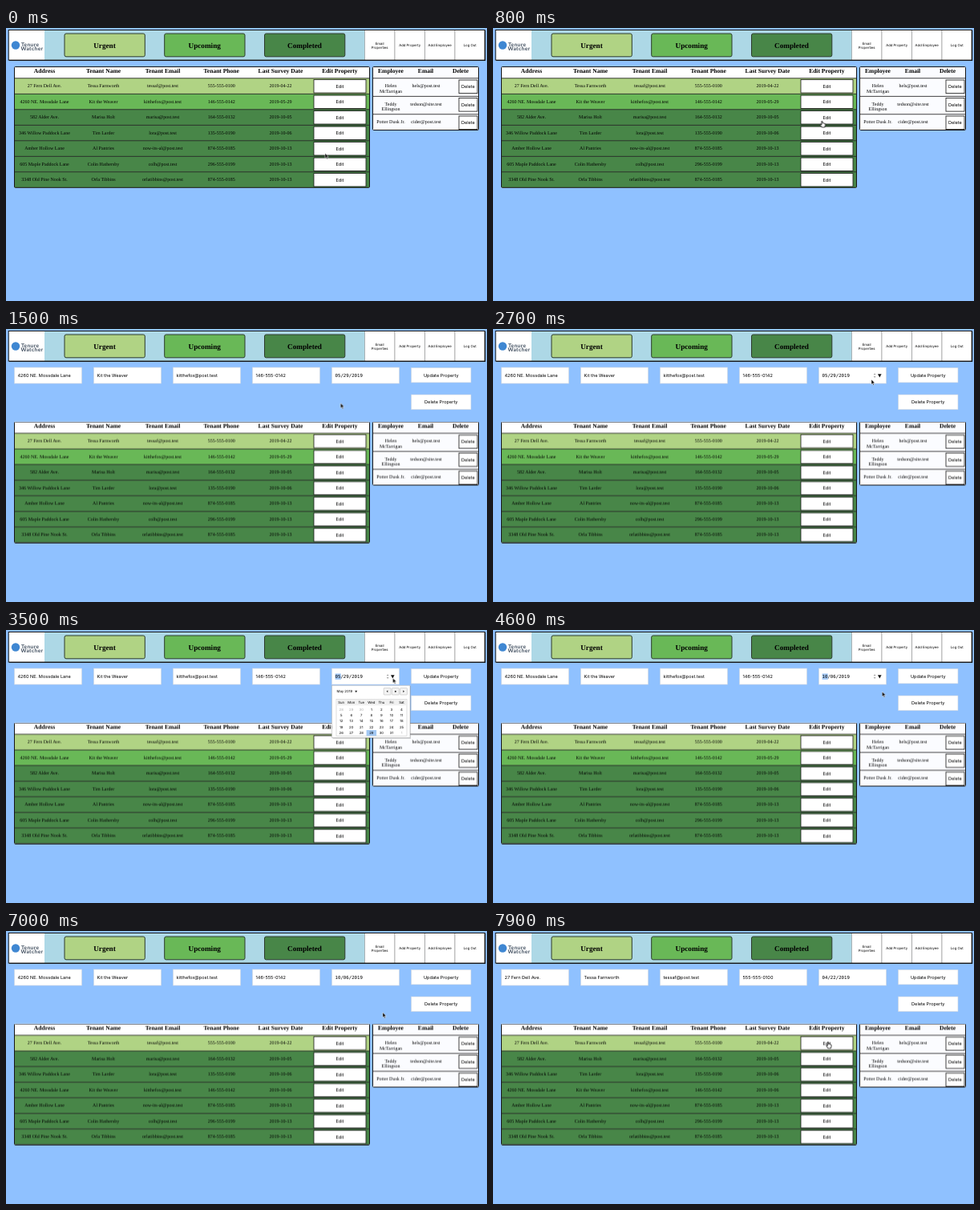
An HTML page for the animation above (8000 ms loop, 600 px wide and 341 px high).

```html
<!DOCTYPE html>
<html lang="en">
<head>
<meta charset="utf-8">
<title>Tenure Watcher</title>
<style>
html, body { margin: 0; width: 100%; height: 100%; overflow: hidden; background: #8fc1ff; }
svg { display: block; width: 100vw; height: 100vh; }
text { text-anchor: middle; text-rendering: geometricPrecision; fill: #000; }
.cell { font: 6px "Liberation Serif", serif; }
.head { font: bold 7.55px "Liberation Serif", serif; }
.tab { font: bold 9.2px "Liberation Serif", serif; }
.ui { font: 5.6px Inter, sans-serif; }
.nav { font: 4.3px Inter, sans-serif; }
.cal { font: 4.3px Inter, sans-serif; }
.date { font: 5.7px "DejaVu Sans Mono", monospace; }
.logo { font: bold 6.6px Lato, sans-serif; letter-spacing: .4px; fill: #3d4b5c; }
.start { text-anchor: start; }
.dim { fill: #aaa; }
.page { animation: drop 8s step-end infinite; }
@keyframes drop {
  0% { transform: none; }
  18.75%, 100% { transform: translateY(67.5px); }
}
.cursor { animation: roam 8s linear infinite; }
@keyframes roam {
  0%, 1.25% { transform: translate(398px, 156.5px); }
  6% { transform: translate(402px, 142px); }
  11.25% { transform: translate(413px, 108px); }
  16%, 23.75% { transform: translate(417.4px, 92.6px); }
  28% { transform: translate(436px, 80px); }
  33.75%, 35% { transform: translate(472px, 63px); }
  40%, 43.75% { transform: translate(482.5px, 60px); }
  48% { transform: translate(484.5px, 69px); }
  52.5%, 60% { transform: translate(485.5px, 77px); }
  62.5% { transform: translate(506px, 68px); }
  65%, 75% { transform: translate(523.5px, 58.5px); }
  77.5% { transform: translate(503px, 74px); }
  80%, 86.25% { transform: translate(479px, 94px); }
  90% { transform: translate(452px, 117px); }
  95%, 100% { transform: translate(418px, 138.5px); }
}
</style>
</head>
<body>
<svg id="stage" viewBox="0 0 600 341" preserveAspectRatio="none"></svg>
<script>
const LOOP = 8000;
const INK = '#151515';
const TONE = { urgent: '#b0d384', soon: '#69b857', done: '#488648' };
const COLS = [48, 121.5, 195.5, 268.7, 342.5];
const ROW_TOP = 62.8, PITCH = 19.5;
let rules = '', ruleId = 0;

const text = (x, y, s, cls) => `<text x="${x}" y="${y}" class="${cls}">${s}</text>`;
const box = (x, y, w, h, fill, stroke = 'none', line = .8, r = 0) =>
  `<rect x="${x}" y="${y}" width="${w}" height="${h}" rx="${r}" fill="${fill}" stroke="${stroke}" stroke-width="${line}"/>`;
const rule = (x, y, w) => box(x, y - .4, w, .8, INK);
const shape = (d, fill, extra = '') => `<path d="${d}" fill="${fill}" ${extra}/>`;

// Shows a group only inside the given [from, to] spans (ms).
function during(spans, body) {
  const name = 'show' + ruleId++;
  const pct = ms => ms / LOOP * 100 + '%';
  const keys = spans.map(([a, b]) => `${pct(a)}{opacity:1}${pct(b)}{opacity:0}`).join('');
  rules += `@keyframes ${name}{0%{opacity:0}${keys}}`;
  return `<g style="animation:${name} ${LOOP}ms step-end infinite">${body}</g>`;
}

const homes = [
  ['27 Fern Dell Ave.', 'Tessa Farnworth', 'tessaf@post.test', '555-555-0100', '2019-04-22', 'urgent'],
  ['4260 NE. Mossdale Lane', 'Kit the Weaver', 'kitthefox@post.test', '146-555-0142', '2019-05-29', 'soon'],
  ['582 Alder Ave.', 'Marisa Holt', 'marisa@post.test', '164-555-0132', '2019-10-05', 'done'],
  ['346 Willow Paddock Lane', 'Tim Larder', 'lora@post.test', '135-555-0190', '2019-10-06', 'done'],
  ['Amber Hollow Lane', 'Al Pantries', 'now-its-al@post.test', '874-555-0185', '2019-10-13', 'done'],
  ['605 Maple Paddock Lane', 'Colin Hathersby', 'colh@post.test', '296-555-0199', '2019-10-13', 'done'],
  ['3348 Old Pine Nook St.', 'Orla Tibbins', 'orlatibbins@post.test', '874-555-0185', '2019-10-13', 'done']
];
const moved = [...homes[1].slice(0, 4), '2019-10-06', 'done'];
const resorted = [homes[0], homes[2], homes[3], moved, ...homes.slice(4)];

const staff = [
  [['Helen', 'McTarrigan'], 'hels@post.test'],
  [['Teddy', 'Ellingson'], 'tedson@site.test'],
  [['Potter Dusk Jr.'], 'cider@post.test']
];

const editButton = (i, fill) => {
  const y = ROW_TOP + i * PITCH;
  return box(384, y + 1.8, 65, 16.4, fill, INK, .8) + text(416.4, y + 11.8, 'Edit', 'ui');
};

const homeRow = (home, i) => {
  const y = ROW_TOP + i * PITCH;
  return box(10.5, y, 443, PITCH, TONE[home[5]]) + rule(10.5, y, 443) +
    COLS.map((x, c) => text(x, y + 11.6, home[c], 'cell')).join('') + editButton(i, '#fff');
};

function homeTable() {
  const heads = ['Address', 'Tenant Name', 'Tenant Email', 'Tenant Phone', 'Last Survey Date', 'Edit Property'];
  return box(10.5, 48.5, 443, 151, '#fff') +
    heads.map((s, i) => text([...COLS, 416.4][i], 56.4, s, 'head')).join('') +
    during([[0, 5800]], homes.map(homeRow).join('')) +
    during([[5800, LOOP]], resorted.map(homeRow).join('')) +
    during([[1300, 1500]], editButton(1, '#c6c6c6')) +
    during([[7800, 7900]], editButton(0, '#c6c6c6')) +
    box(10.5, 48.5, 443, 150.8, 'none', INK, 1, 1);
}

function staffTable() {
  const rows = staff.map(([name, mail], i) => {
    const y = ROW_TOP + i * 22.5;
    return rule(457.5, y, 132) +
      name.map((s, n) => text(480, y + 11.6 + n * 6.5, s, 'cell')).join('') +
      text(524, y + 11.6, mail, 'cell') +
      box(565, y + 2.2, 23, 16.6, '#fff', INK) + text(576.4, y + 12.4, 'Delete', 'ui');
  }).join('');
  return box(457.5, 48.5, 132, 79, '#fbfcff') +
    ['Employee', 'Email', 'Delete'].map((s, i) => text([480, 523.5, 567][i], 56.4, s, 'head')).join('') +
    rows + box(457.5, 48.5, 132, 79, 'none', INK, 1, 1);
}

function topBar() {
  const tabs = [['Urgent', 'urgent', 73], ['Upcoming', 'soon', 197.7], ['Completed', 'done', 322.5]];
  const nav = [['Email', 'Properties'], ['Add Property'], ['Add Employee'], ['Log Out']];
  return box(3.5, 2.5, 594, 38, '#add8e6') + box(3.5, 2.5, 44.5, 38, '#fff') +
    '<circle cx="12" cy="21.5" r="5.2" fill="#3f87d2"/>' +
    text(19, 22.6, 'Tenure', 'logo start') + text(18.5, 28, 'Watcher', 'logo start') +
    tabs.map(([s, tone, x]) => box(x, 7, 100.3, 28.8, TONE[tone], '#2c3a2c', 1, 2) +
      text(x + 50, 24.6, s, 'tab')).join('') +
    nav.map((lines, i) => {
      const x = 447.5 + i * 37.5;
      return box(x, 2.5, 37.5, 38, '#fff', '#8a8a8a', .6) +
        lines.map((s, n) => text(x + 18.7, 23.2 + n * 5 - (lines.length - 1) * 2.6, s, 'nav')).join('');
    }).join('') +
    box(3.2, 2.5, 594, 37.6, 'none', INK, 1) + box(597, 3, 1.2, 38, INK) + box(4, 40, 594, 1, INK);
}

const field = i => 10.5 + i * 99;
const values = home => home.slice(0, 4).map((s, i) => text(field(i) + 4, 60, s, 'ui start')).join('');
const dateText = s => text(410.6, 60.2, s, 'date start');
const formButton = (y, s, fill = '#fff') =>
  box(505.5, y, 74.5, 18.6, fill, '#c9d3e0', .6) + text(542.8, y + 11.3, s, 'ui');

function form() {
  const inputs = [0, 1, 2, 3, 4].map(i => box(field(i), 48, 84, 20, '#fff', '#cfd8e4', .7)).join('');
  const arrows = shape('M474.6 57.2l1.5-2 1.5 2zM474.6 59l1.5 2 1.5-2z', '#a5a5a5') +
    shape('M480 56.2h4.6l-2.3 4.2z', '#111');
  return inputs +
    during([[0, 7900]], values(homes[1])) + during([[7900, LOOP]], values(homes[0])) +
    during([[3200, 5500]], box(410.6, 54.4, 7.2, 7.6, '#a6cbf8')) +
    during([[2500, 5500]], arrows) +
    during([[0, 4500]], dateText('05/29/2019')) +
    during([[4500, 7900]], dateText('10/06/2019')) +
    during([[7900, LOOP]], dateText('04/22/2019')) +
    formButton(48.3, 'Update Property') + formButton(82, 'Delete Property') +
    during([[5400, 5500]], formButton(48.3, 'Update Property', '#c6c6c6'));
}

function calendar() {
  const colX = c => 418.2 + c * 12.55;
  let out = box(407.5, 70, 97.5, 66, 'rgba(0,0,0,.16)') + box(406.5, 69.2, 97.5, 65.2, '#fff', '#b5b5b5', .6) +
    text(412.5, 78.4, 'May 2019', 'cal start') + shape('M435.2 75.8h3l-1.5 2.4z', '#222');
  [471.2, 481.4, 491.6].forEach((x, i) => {
    out += box(x, 72.4, 8.8, 8.6, '#f3f3f3', '#b0b0b0', .5, .8) +
      (i === 1 ? `<circle cx="${x + 4.4}" cy="76.7" r="1" fill="#222"/>`
        : shape(i ? `M${x + 3.7} 75.3v2.8l1.7-1.4z` : `M${x + 5.1} 75.3v2.8l-1.7-1.4z`, '#222'));
  });
  out += box(412, 86.6, 88, 45.6, '#fff', '#bcbcbc', .5) + box(412.2, 86.8, 87.6, 7.4, '#f0f0f0');
  ['Sun', 'Mon', 'Tue', 'Wed', 'Thu', 'Fri', 'Sat'].forEach((d, c) => out += text(colX(c), 92, d, 'cal'));
  out += box(449.6, 125, 12.5, 7.2, '#a3c8f3');
  for (let i = 0; i < 35; i++) {
    const day = new Date(2019, 3, 28 + i);
    out += text(colX(i % 7), 100.6 + Math.floor(i / 7) * 7.4, day.getDate(),
      day.getMonth() === 4 ? 'cal' : 'cal dim');
  }
  return out + during([[4400, 4500]], box(481.4, 72.4, 8.8, 8.6, 'rgba(0,0,0,.18)', 'none', 0, .8));
}

function cursor() {
  const arrow = shape('M0 0V6.2L1.4 4.9 2.4 7.2 3.4 6.8 2.4 4.6H4.3Z', '#000', 'stroke="#fff" stroke-width=".5"');
  const hand = shape('M-.7 .6Q0 -.4 .7 .6V3Q1.6 2.4 2 3.1 2.9 2.7 3.2 3.4 4 3.1 4.1 4V5.6L3.4 8H-.2L-2.3 5Q-2.4 4 -1.4 4.4L-.7 5Z',
    '#fff', 'stroke="#000" stroke-width=".75" stroke-linejoin="round"');
  return `<g class="cursor">${during([[0, 300], [1500, 5000], [6100, 7400]], arrow)}${
    during([[300, 1500], [5000, 6100], [7400, LOOP]], hand)}</g>`;
}

document.getElementById('stage').innerHTML =
  box(0, 0, 600, 341, '#8fc1ff') + topBar() +
  `<g class="page">${homeTable()}${staffTable()}</g>` +
  during([[1500, LOOP]], form()) +
  during([[3200, 4500]], calendar()) + cursor();
const sheet = document.createElement('style');
sheet.textContent = rules;
document.head.append(sheet);
</script>
</body>
</html>
```
